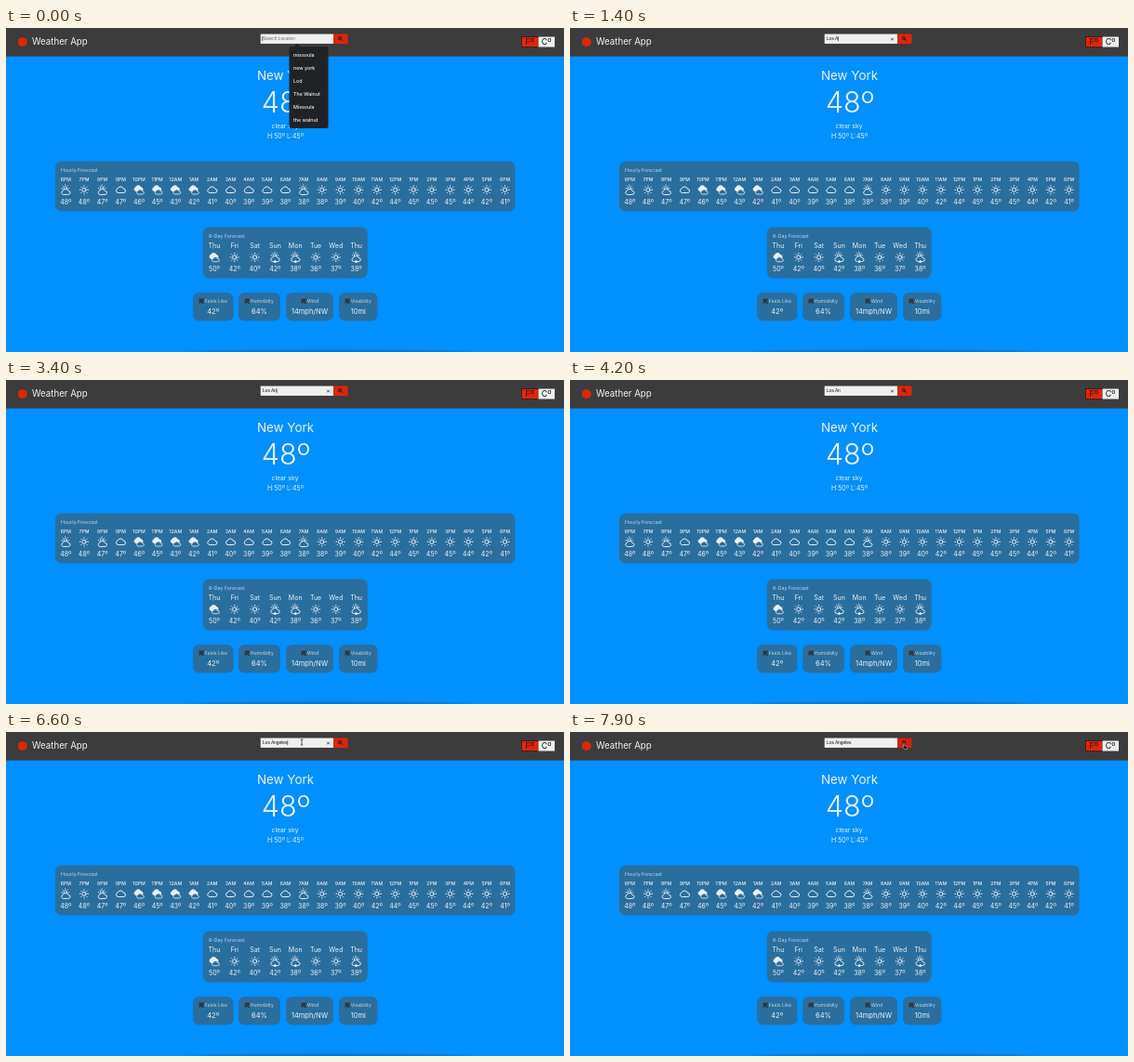
Recreate the animation shown at these times as an HTML page. Size 600x349 px, loop 8 s.

```html
<!DOCTYPE html>
<html lang="en">
<head>
<meta charset="utf-8">
<title>Weather App</title>
<style>
html, body { margin: 0; width: 100%; height: 100%; overflow: hidden; background: #0090ff; }
svg { display: block; width: 100vw; height: 100vh; }
text { font-family: Inter, "Open Sans", sans-serif; fill: #f0f3f5; white-space: pre; }
.field { font-family: "Liberation Sans", Arial, sans-serif; }
.line { fill: none; stroke: #f0f3f5; stroke-width: 1; stroke-linecap: round; stroke-linejoin: round; }
.cover { fill: #2a6e9e; }
.solid { fill: #f0f3f5; }
</style>
</head>
<body>
<svg viewBox="0 0 600 349">
  <defs>
    <path id="cloud" d="M-3.2 3.2A2.3 2.3 0 0 1-3.4-1.2A3.4 3.4 0 0 1 3-1A2.1 2.1 0 0 1 3.2 3.2Z"/>
    <g id="sun" class="line">
      <circle r="2.1"/>
      <path id="rays"/>
    </g>
    <g id="cloudy" class="line"><use href="#cloud"/></g>
    <g id="partly" class="line">
      <use href="#sun" transform="translate(-.5 -1.5) scale(.85)"/>
      <use href="#cloud" class="cover" transform="translate(0 2.2) scale(.92)"/>
    </g>
    <g id="broken" class="line">
      <use href="#cloud" class="solid" transform="translate(-.6 -1.5) scale(.9)"/>
      <use href="#cloud" class="cover" transform="translate(1.3 2.2) scale(.78)"/>
    </g>
    <g id="rain" class="line">
      <use href="#partly" transform="translate(0 -.6)"/>
      <path class="solid" d="M0 2.6l1 1.8a1.1 1.1 0 1 1-2 0z" stroke="none"/>
    </g>
    <filter id="soft" x="-20%" y="-300%" width="140%" height="700%">
      <feGaussianBlur stdDeviation="7 1.5"/>
    </filter>
  </defs>

  <rect width="600" height="349" fill="#0090ff"/>
  <ellipse cx="348" cy="350" rx="150" ry="2.5" fill="#003a70" opacity=".45" filter="url(#soft)"/>
  <rect width="600" height="30.6" fill="#3d3c3c"/>
  <circle cx="17.8" cy="15" r="5" fill="#e1250c"/>
  <g id="page"></g>

  <rect x="273.7" y="6.5" width="78.3" height="10.4" fill="#efefef"/>
  <rect id="button" x="352" y="6.5" width="15.5" height="10.4"/>
  <g fill="none" stroke="#16100f" stroke-width=".9">
    <circle cx="359" cy="11.1" r="1.5"/>
    <path d="M360.1 12.2l1.7 1.7"/>
  </g>
  <text id="query" class="field" x="276" y="13.4" font-size="4.85"></text>
  <path id="caret" d="M0 9.2v5" stroke="#111" stroke-width=".6"/>
  <path id="clear" d="M345.2 10.7l2.6 2.6m0-2.6l-2.6 2.6" stroke="#1d2c40" stroke-width=".8"/>

  <rect x="554.5" y="9.5" width="18" height="11" fill="#e1250c" stroke="#1a1a1a" stroke-width=".7"/>
  <rect x="572.5" y="9.5" width="17.5" height="11" fill="#efefef"/>
  <g id="units"></g>

  <g id="menu">
    <path d="M306.5 20h3l3.5-3l3.5 3h28a2 2 0 0 1 2 2v84a2 2 0 0 1-2 2h-38a2 2 0 0 1-2-2v-84a2 2 0 0 1 2-2z" fill="#202326"/>
  </g>
  <path id="beam" d="M-1.3-3.2q1.3 0 1.3.9q0-.9 1.3-.9M0-2.3v4.6M-1.3 3.2q1.3 0 1.3-.9q0 .9 1.3.9" fill="none" stroke="#111" stroke-width=".7"/>
  <path id="hand" d="M-1.3-2.6q.7-.8 1.2 0v2l2.4.6q.7.3.6 1l-.5 2.3h-3l-1.7-2.2q-.2-.9.6-.6l.4.3z" fill="#111" stroke="#f2f2f2" stroke-width=".45"/>
</svg>
<script>
const $ = id => document.getElementById(id);
const page = $('page');

function add(parent, tag, attrs, content = '') {
  const el = document.createElementNS('http://www.w3.org/2000/svg', tag);
  for (const key in attrs) el.setAttribute(key, attrs[key]);
  el.textContent = content;
  parent.append(el);
  return el;
}

// Text is placed by its vertical middle
function label(content, x, y, size, extra = {}, parent = page) {
  add(parent, 'text', { x, y: y + size * .36, 'font-size': size, 'text-anchor': 'middle', ...extra }, content);
}

const left = { 'text-anchor': 'start' };
const faint = { 'text-anchor': 'start', style: 'fill:#c3d5e2' };
const panel = (x, y, width, height) =>
  add(page, 'rect', { x, y, width, height, rx: 6.5, class: 'cover' });
const icon = (name, x, y) =>
  add(page, 'use', { href: '#' + name, transform: `translate(${x} ${y})` });

$('rays').setAttribute('d', Array.from({ length: 8 }, (_, i) => {
  const c = Math.cos(i * Math.PI / 4), s = Math.sin(i * Math.PI / 4);
  return `M${c * 3.9} ${s * 3.9}L${c * 4.6} ${s * 4.6}`;
}).join(''));

// Header and current weather
label('Weather App', 28, 15, 9.7, left);
label('New York', 300.5, 50.8, 13.4);
label('48º', 301, 79.8, 30.5, { 'font-weight': 350 });
label('clear sky', 300, 105.2, 6.8);
label('H:50º L:45º', 300.5, 116, 7);
label('Fº', 563.3, 15, 8.8, { style: 'fill:#24100d' }, $('units'));
label('Cº', 581.2, 15, 8.8, { style: 'fill:#151515' }, $('units'));

const iconNames = { s: 'sun', c: 'cloudy', p: 'partly', b: 'broken', r: 'rain' };

// Hourly forecast
panel(53, 143.5, 494.5, 54);
label('Hourly Forecast', 59, 153, 5.3, faint);
const hourTemps = [48, 48, 47, 47, 46, 45, 43, 42, 41, 40, 39, 39, 38,
  38, 38, 39, 40, 42, 44, 45, 45, 45, 44, 42, 41];
[...'pspcbbbbcccccp' + 's'.repeat(11)].forEach((kind, i) => {
  const x = 64.3 + i * 19.68, hour = (18 + i) % 24;
  label((hour % 12 || 12) + (hour < 12 ? 'AM' : 'PM'), x, 162.7, 5.1, { 'font-weight': 500 });
  icon(iconNames[kind], x, 174.3);
  label(hourTemps[i] + 'º', x, 187, 7);
});

// Daily forecast
panel(211.7, 214.5, 177, 55);
label('8-Day Forecast', 218, 224, 5.3, faint);
const dayTemps = [50, 42, 40, 42, 38, 36, 37, 38];
'Thu Fri Sat Sun Mon Tue Wed Thu'.split(' ').forEach((day, i) => {
  const x = 224 + i * 21.8;
  label(day, x, 234.5, 7);
  icon(iconNames['bssrrssr'[i]], x, 247);
  label(dayTemps[i] + 'º', x, 259.7, 7);
});

// Detail cards: x, width, title, value
[
  [201, 43.5, 'Feels Like', '42º'],
  [250, 45, 'Humididty', '64%'],
  [301, 51, 'Wind', '14mph/NW'],
  [358, 41.5, 'Visability', '10mi']
].forEach(([x, width, title, value]) => {
  const mid = x + width / 2;
  panel(x, 285, width, 30.5);
  const start = title === 'Wind' ? mid - 9 : x + 6.5;
  add(page, 'path', { d: `M${start} 292l2-.6h3.2l.5 1.6l-1.4 1.4l1.4 2.6h-1.7l-1.5-1l-2.5 1z`, fill: '#34383b' });
  label(title, start + 6.2, 294.3, 5.2, faint);
  label(value, mid, 305.5, 7.5);
});

['missoula', 'new york', 'Lod', 'The Walnut', 'Missoula', 'the walnut'].forEach((item, i) =>
  label(item, 309, 29 + i * 14, 5.3, { ...left, 'font-weight': 500 }, $('menu')));

// Typing: time of each key and the text after it
const keys = [
  [0, ''], [100, 'L'], [200, 'Lo'], [300, 'Los'], [900, 'Los '], [1300, 'Los A'],
  [1700, 'Los An'], [2100, 'Los Ana'], [3400, 'Los An'], [4400, 'Los Ang'],
  [4600, 'Los Ange'], [4800, 'Los Angel'], [5000, 'Los Angele'], [5200, 'Los Angeles']
];
const show = (id, on) => $(id).setAttribute('visibility', on ? 'visible' : 'hidden');

function draw(now) {
  const t = now % 8000;
  const [keyTime, typed] = keys.findLast(key => key[0] <= t);
  const query = $('query');
  query.textContent = typed || 'Search Location';
  query.style.fill = typed ? '#111' : '#707070';

  const clicked = t >= 7800;
  const caretX = 276 + (typed ? query.getComputedTextLength() : -.6);
  $('caret').setAttribute('transform', `translate(${caretX + .3} 0)`);
  show('caret', !clicked && (t - keyTime) % 1000 < 500);
  show('clear', typed && !clicked);
  show('menu', !typed);

  const p = Math.min(1, Math.max(0, (t - 7300) / 400));
  const ease = p * p * (3 - 2 * p);
  const x = 318 + 42 * ease, y = 11 + 4.2 * ease;
  const over = x >= 352;
  for (const id of ['beam', 'hand']) $(id).setAttribute('transform', `translate(${x} ${y})`);
  show('beam', t >= 6400 && !over);
  show('hand', over);
  $('button').setAttribute('fill', over ? '#d3210b' : '#e1250c');
}

const begin = performance.now();
function tick() {
  draw(performance.now() - begin);
  requestAnimationFrame(tick);
}
tick();
</script>
</body>
</html>
```
